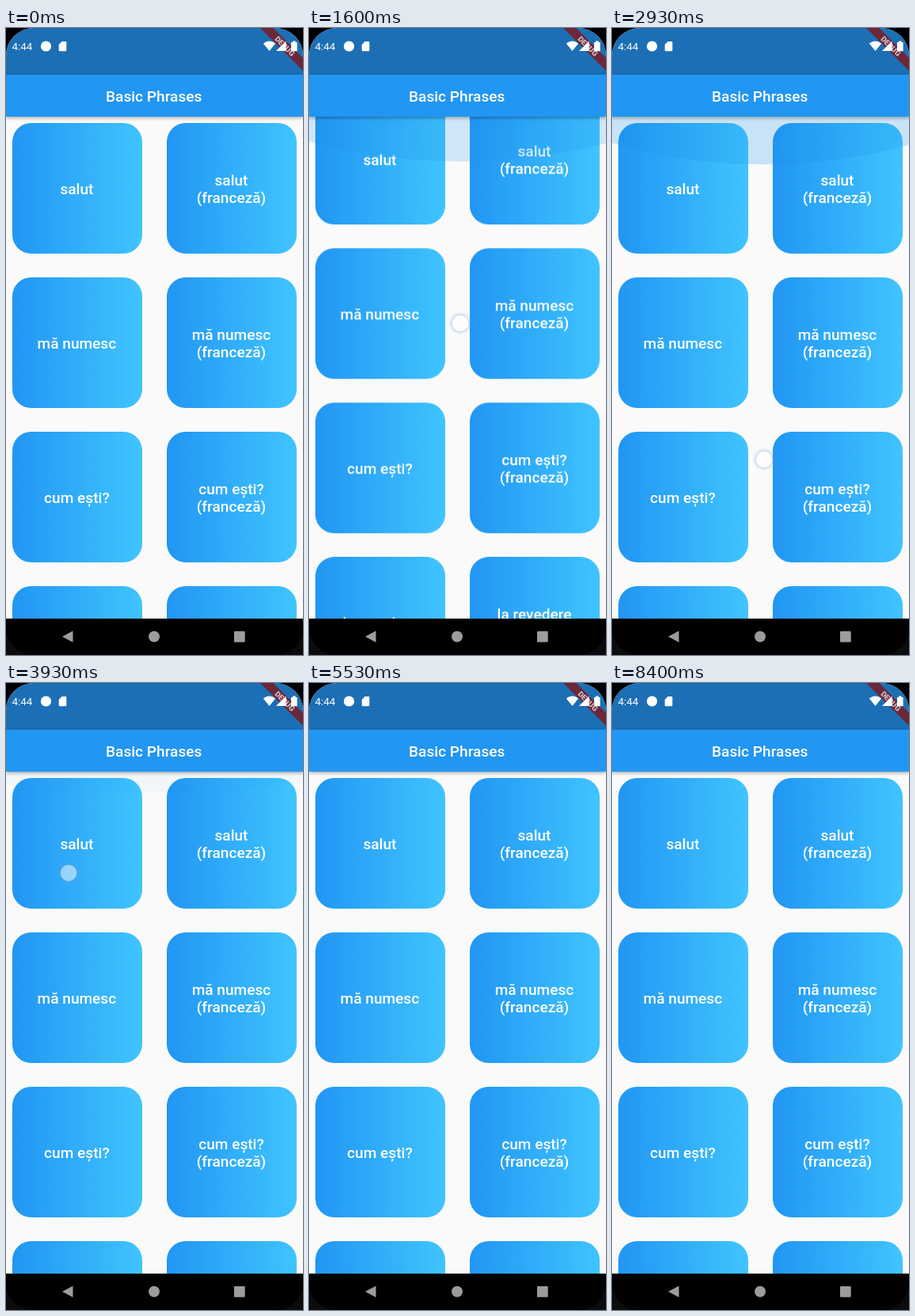
An HTML page that plays this animation: 375 px wide and 792 px high, repeating every 9670 ms.

```html
<!DOCTYPE html>
<html lang="ro">
<head>
<meta charset="utf-8">
<title>Basic Phrases</title>
<style>
  html, body { margin: 0; width: 100%; height: 100%; overflow: hidden; background: #000; }
  #stage { position: relative; width: 375px; height: 792px; overflow: hidden; background: #0c0c0c;
    font-family: Roboto, "Noto Sans", sans-serif; color: #fff; }
  #stage > * { position: absolute; }
  #phone { inset: 0; background: #000; border-radius: 0 0 34px 34px; }
  #screen { left: 0; top: 0; width: 375px; height: 746px; overflow: hidden;
    background: #fafafa; border-radius: 35px 35px 0 0; }
  #screen > * { position: absolute; left: 0; }
  #view { top: 112px; width: 375px; height: 634px; overflow: hidden; }
  #list { position: absolute; inset: 0; will-change: transform; }
  .card { position: absolute; width: 164.6px; height: 164.6px; border-radius: 23.8px; overflow: hidden;
    background: linear-gradient(90deg, #2196f3, #40c4ff);
    display: flex; align-items: center; justify-content: center; text-align: center;
    font-weight: 500; font-size: 19.08px; line-height: 22px; white-space: pre; }
  .card span { position: relative; left: -.5px; top: 1.6px; }
  .card i { position: absolute; inset: 0; background: #c8c8c8; opacity: 0; }
  .card b { position: absolute; left: 84px; top: 88px; width: 240px; height: 240px; margin: -120px;
    border-radius: 50%; background: #c8c8c8; opacity: 0; }
  #glow { position: absolute; left: 0; top: 0; }
  #status { top: 0; width: 375px; height: 59px; background: #1c6fb5; }
  #bar { top: 59px; width: 373.4px; padding-right: 1.6px; height: 53px; background: #2196f3;
    text-align: center; font-weight: 500; font-size: 19.08px; line-height: 56px;
    box-shadow: 0 2px 4px rgba(0,0,0,.24), 0 1px 5px rgba(0,0,0,.1); }
  #top, #nav { left: 0; top: 0; }
  #touch { left: -15px; top: -15px; }
</style>
</head>
<body>
<div id="stage">
  <div id="phone"></div>
  <div id="screen">
    <div id="view">
      <div id="list"></div>
      <svg id="glow" width="375" height="634" fill="#1f90e8">
        <ellipse id="glowTop" cx="192" rx="562.5"/>
        <ellipse id="glowEnd" cx="183" rx="562.5"/>
      </svg>
    </div>
    <div id="status"></div>
    <div id="bar">Basic Phrases</div>
    <svg id="top" width="375" height="60" fill="#fff">
      <g transform="translate(375 0) rotate(45)">
        <rect x="-40" y="26.7" width="80" height="11.5" fill="#6a2839"/>
        <text y="35.9" text-anchor="middle" font-size="9.7" font-weight="900" fill="#d2bec6">DEBUG</text>
      </g>
      <text x="7.5" y="28" font-size="13.4">4:44</text>
      <circle cx="50.5" cy="23" r="6.6"/>
      <path d="M70.5 17H75q1.3 0 1.3 1.3V28q0 1.3-1.3 1.3H68q-1.3 0-1.3-1.3V21Z"/>
      <path d="M324.8 19.5Q332.5 13.5 340.2 19.5L332.5 29Z"/>
      <path d="M341 29L353.5 16.5V29Z"/>
      <path d="M362 16.5h3.6V18h2V29.2h-7.6V18h2Z"/>
    </svg>
  </div>
  <svg id="nav" width="375" height="792" fill="#9c9c9c">
    <path d="M84.5 761.5V776L71 768.8Z"/>
    <circle cx="187" cy="768.7" r="7"/>
    <rect x="288" y="762" width="13.7" height="13.7" rx="1"/>
  </svg>
  <svg id="touch" width="30" height="30" fill="none">
    <circle cx="15" cy="15" r="10.5" fill="#fff" opacity=".5"/>
    <circle cx="15" cy="15" r="11" stroke="#5a82b4" stroke-opacity=".24" stroke-width="1.6"/>
    <circle cx="15" cy="15" r="12.8" stroke="#78b4e6" stroke-opacity=".13" stroke-width="2.4"/>
  </svg>
</div>
<script>
const LOOP = 9670, TICK = 200 / 3, VIEW_TOP = 112, VIEW_H = 634;
const PITCH = 195.1, MAX_SCROLL = 132.3;
const $ = id => document.getElementById(id);

// Turning points of the dragging finger: time, x, y
const finger = [[867, 190, 300], [1267, 186, 556], [1400, 186, 556], [1800, 196, 190], [2300, 201, 205],
  [2933, 192, 545], [3033, 178, 545], [3533, 82, 125], [4133, 78, 280]];

// The list is thrown to its end and back twice: start and end of each move
const throws = [[1467, 1850], [2533, 2800], [3067, 3333], [3533, 3800]];

// Overscroll glows: start, full, release, gone, strength
const topGlows = [[800, 1267, 1467, 2067, 1], [2733, 2933, 3033, 3533, 1], [3733, 3800, 3867, 4267, .2]];
const endGlows = [[1800, 2133, 2267, 2867, .8], [3267, 3400, 3433, 3800, .5]];

// Card index, start, end
const taps = [[3, 5200, 5530], [2, 6800, 7060], [5, 8060, 8395]];

const cards = ["salut", "mă numesc", "cum ești?", "la revedere"].flatMap((phrase, row) =>
  [phrase, phrase + "\n(franceză)"].map((label, col) => {
    const el = document.createElement("div");
    el.className = "card";
    el.style.left = 7.6 + col * PITCH + "px";
    el.style.top = 8.1 + row * PITCH + "px";
    el.innerHTML = "<i></i><b></b><span>" + label + "</span>";
    $("list").append(el);
    return el;
  }));

const mix = (a, b, k) => a + (b - a) * k;

function ease(from, to, t) {
  const k = Math.min(1, Math.max(0, (t - from) / (to - from)));
  return k * k * (3 - 2 * k);
}

function fingerAt(t) {
  const n = Math.max(1, finger.findIndex(p => p[0] > t));
  const [t0, x0, y0] = finger[n - 1], [t1, x1, y1] = finger[n], k = ease(t0, t1, t);
  return [mix(x0, x1, k), mix(y0, y1, k)];
}

// Odd throws go down the list, even ones return
function scrollAt(t) {
  return MAX_SCROLL * throws.reduce((sum, [a, b], i) => sum + (i % 2 ? -1 : 1) * ease(a, b, t), 0);
}

function setGlow(el, bursts, t, fromEnd) {
  const level = Math.max(...bursts.map(([a, b, c, d, power]) => power * (ease(a, b, t) - ease(c, d, t))));
  const size = .8 * Math.sqrt(Math.max(0, level)), cy = (75.4 - 562.5) * size;
  el.setAttribute("cy", fromEnd ? VIEW_H - cy : cy);
  el.setAttribute("ry", 562.5 * size);
  el.setAttribute("opacity", .22 * level);
}

function showTouch(x, y) {
  $("touch").style.display = "block";
  $("touch").style.transform = `translate(${x}px, ${y}px)`;
}

function drawTap([index, start, end], t) {
  const card = cards[index], [wash, splash] = card.children;
  const k = (t - start) / (end - start), on = k >= 0 && k < 1;
  wash.style.opacity = on ? .2 * Math.min(1, (k + .2) * 3, (1 - k) * 2) : 0;
  splash.style.opacity = on ? .28 * Math.min(1, (1 - k) * 1.6) : 0;
  if (!on) return;
  splash.style.transform = `scale(${mix(.15, 1, Math.sqrt(k))})`;
  if (k < .55) showTouch(card.offsetLeft + 84, VIEW_TOP + card.offsetTop + 88);
}

function draw(now) {
  // The screen refreshes in discrete ticks
  const t = Math.floor((now % LOOP + 5) / TICK) * TICK;
  $("touch").style.display = "none";
  $("list").style.transform = `translateY(${-scrollAt(t)}px)`;
  setGlow($("glowTop"), topGlows, t, false);
  setGlow($("glowEnd"), endGlows, t, true);
  if (t > 860 && t < 4130) showTouch(...fingerAt(t));
  taps.forEach(tap => drawTap(tap, t));
}

const begin = performance.now();
function loop() {
  draw(performance.now() - begin);
  requestAnimationFrame(loop);
}
loop();
</script>
</body>
</html>
```
